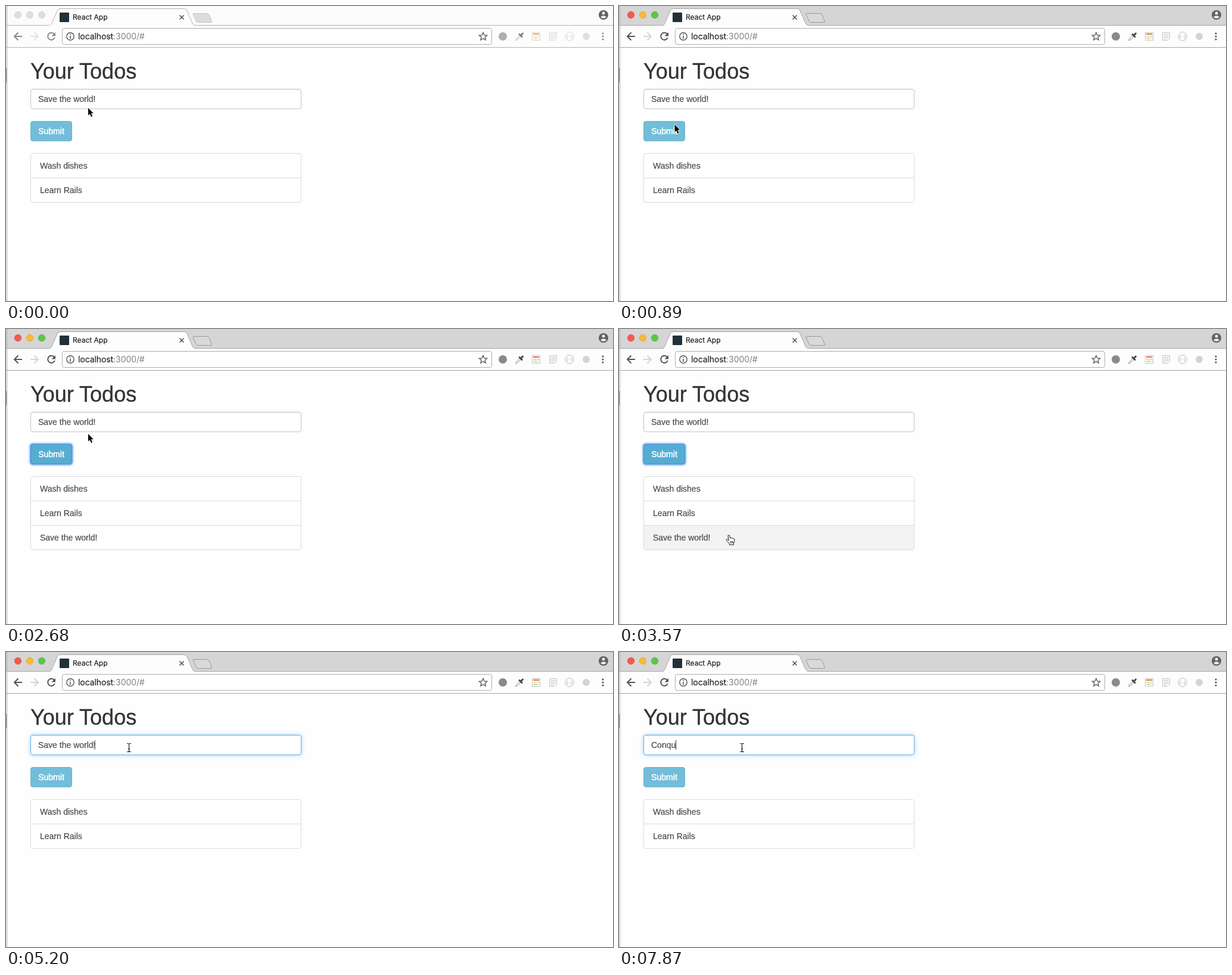
An HTML page for the animation above (8 s loop, 1019 px wide and 495 px high).

```html
<!DOCTYPE html>
<html lang="en">
<head>
<meta charset="utf-8">
<title>Your Todos</title>
<style>
  html, body { margin: 0; width: 100%; height: 100%; overflow: hidden; background: #fefefe; }
  #stage { position: relative; width: 1019px; height: 495px; overflow: hidden;
    font: 14px/20px "Liberation Sans", Arial, sans-serif; color: #484848; -webkit-text-stroke: .18px; }
  #stage > * { position: absolute; box-sizing: border-box; }
  svg { left: 0; top: 0; overflow: visible; -webkit-text-stroke: 0; }
  svg text { font-family: Inter, Roboto, sans-serif; }

  /* browser window */
  .strip { fill: #d5d5d5; }
  .plus { fill: #d9d9d9; stroke: #999; }
  .edge { fill: none; stroke: #a6a6a6; }
  .idle .strip { fill: #fbfbfb; }
  .idle .plus { fill: #dcdcdc; stroke: #c4c4c4; }
  .idle .edge { stroke: #b4b4b4; }
  .idle .lights circle { fill: #dedede; stroke: #d2d2d2; }
  .idle .tools { opacity: .68; }
  .line { fill: none; stroke: #555; stroke-width: 2; }

  /* page */
  h1 { margin: 0; left: 41px; top: 90px; font-size: 36px; line-height: 40px; font-weight: 400;
    color: #333; white-space: nowrap; -webkit-text-stroke: .35px; }
  #field { left: 41px; top: 139px; width: 455px; height: 34px; padding: 8px 12px; line-height: 16px;
    background: #fff; border: 1px solid #c4c4c4; border-radius: 4px; white-space: pre;
    box-shadow: inset 0 1px 1px rgba(0,0,0,.07); }
  #field span { display: inline-block; height: 16px; vertical-align: top; }
  #field .all { background: #b0d3fb; }
  #field .last { background: #c9c9c9; }
  #field .caret { width: 1px; margin-right: -1px; background: #333; }
  #field.half { border-color: #99bedb; box-shadow: 0 0 5px rgba(102,175,233,.35); }
  #field.on { border-color: #6cb0e6; box-shadow: inset 0 1px 1px rgba(0,0,0,.07), 0 0 7px rgba(102,175,233,.6); }
  #button { left: 41px; top: 193px; width: 70px; height: 34px; line-height: 32px; text-align: center;
    color: #fff; -webkit-text-stroke: .5px; background: #73bdd9; border: 1px solid #68b3d2; border-radius: 4px; }
  #button.hover, #button.focus { background: #56add3; border-color: #4a9fc6; }
  #button.down { background: #4598ba; }
  #button.down, #button.focus { border-color: #448fd6; box-shadow: 0 0 3px 1.5px rgba(88,155,248,.9); }
  #button.down { box-shadow: inset 0 3px 5px rgba(0,0,0,.125), 0 0 3px 1.5px rgba(88,155,248,.9); }
  #list { left: 41px; top: 247px; width: 455px; border: 1px solid #dadada; border-radius: 4px;
    background: #fff; overflow: hidden; }
  #list div { height: 40px; line-height: 40px; padding-left: 15px; }
  #list div + div { border-top: 1px solid #dadada; }
  #list .hover { background: #f3f3f3; }
</style>
</head>
<body>
<div id="stage">
  <svg width="1019" height="495">
    <rect class="strip" width="1019" height="33"/>
    <rect y="33" width="1019" height="37" fill="#fdfdfd"/>
    <path d="M72 33C76 33 76 31 77 29L86 8Q87.500 4.500 91 4.500H299Q302.500 4.500 304 8L313 29Q315 33 318 33Z" fill="#fdfdfd"/>
    <path class="edge" d="M0 32.500H71C75 32.500 76 31 77 29L86 8Q87.500 4.500 91 4.500H299Q302.500 4.500 304 8L313 29Q315 32.500 318 32.500H1019M0 69.500H1019"/>
    <path class="plus" d="M315.500 12.500H337Q340 12.500 341 15L345.500 26Q346 27.500 344 27.500H323Q320 27.500 319 25L314 14Q313.500 12.500 315.500 12.500Z"/>
    <path d="M1.500 0V495" stroke="#adadad"/>
    <path d="M1 104V128" stroke="#a0a0a0" stroke-width="2"/>
    <g class="lights" stroke-width=".7">
      <circle cx="20" cy="15" r="5.700" fill="#f25a50" stroke="#dc473f"/>
      <circle cx="40" cy="15" r="5.700" fill="#f6bb36" stroke="#dda22c"/>
      <circle cx="60" cy="15" r="5.700" fill="#5dc649" stroke="#4aad37"/>
    </g>
    <rect x="90" y="11" width="16" height="16" rx="1" fill="#22303a"/>
    <text x="112" y="23" font-size="12" fill="#1c1c1c" stroke="#1c1c1c" stroke-width=".2">React App</text>
    <path d="M291.500 15.500L298.500 22.500M298.500 15.500L291.500 22.500" stroke="#4d4d4d" stroke-width="1.500"/>
    <circle cx="1003" cy="15" r="8" fill="#616161"/>
    <circle cx="1003" cy="12" r="2.500" fill="#eee"/>
    <path d="M998 18.500Q1003 14 1008 18.500Q1003 23 998 18.500Z" fill="#eee"/>

    <rect x="94.500" y="37.500" width="721" height="27" rx="3" fill="#fff" stroke="#adadad"/>
    <circle cx="108" cy="51" r="6.200" fill="none" stroke="#555" stroke-width="1.400"/>
    <path d="M108 47V48.600M108 50V55" stroke="#555" stroke-width="1.600"/>
    <text x="121" y="56" font-size="14" letter-spacing="-.08" fill="#222" stroke="#222" stroke-width=".15">localhost<tspan fill="#808080" stroke="none">:3000/#</tspan></text>
    <path d="M801 44.500L802.900 49L807.600 49.300L804 52.400L805.200 57.100L801 54.500L796.800 57.100L798 52.400L794.400 49.300L799.100 49Z" fill="none" stroke="#555" stroke-width="1.300"/>
    <g class="tools">
      <path class="line" d="M27 51H14.500M20.500 44.500L14 51L20.500 57.500"/>
      <path class="line" d="M41 51H53.500M47.500 44.500L54 51L47.500 57.500" style="stroke:#d4d4d4"/>
      <path class="line" d="M80.800 47A6 6 0 1 0 81.800 53"/>
      <path d="M83 44V50.500H76.500Z" fill="#555"/>
      <circle cx="834" cy="51" r="7" fill="#8a8a8a"/>
      <path d="M855.500 58L856.500 55L862.500 49L864.500 51L858.500 57Z" fill="#eee" stroke="#999"/>
      <path d="M862 47.500L866 51.500M864.500 49L867.500 46" stroke="#484848" stroke-width="3" stroke-linecap="round"/>
      <rect x="883.500" y="44.500" width="13" height="13" fill="#fffdf2" stroke="#c5c5b8"/>
      <path d="M885 47H895" stroke="#ea6b5b" stroke-width="2"/>
      <path d="M886 51.500H890M891.500 51.500H895" stroke="#ddb84c"/>
      <path d="M886 54.500H892" stroke="#86bd68"/>
      <path d="M912.500 44.500H924.500V54L921 57.500H912.500Z" fill="#f7f7f7" stroke="#c6c6c6"/>
      <path d="M914.500 47.500H922.500M914.500 50H922.500M914.500 52.500H922.500M914.500 55H919" stroke="#cdcdcd"/>
      <circle cx="946" cy="51" r="7.300" fill="#fff" stroke="#bcbcbc"/>
      <text x="946" y="54" font-size="8" text-anchor="middle" fill="#999">{··}</text>
      <circle cx="974" cy="51" r="6" fill="#d3d3d3"/>
      <g fill="#555"><circle cx="1002" cy="46" r="1.600"/><circle cx="1002" cy="51" r="1.600"/><circle cx="1002" cy="56" r="1.600"/></g>
    </g>
  </svg>

  <h1>Your Todos</h1>
  <div id="field"></div>
  <div id="button">Submit</div>
  <div id="list"></div>

  <svg width="1019" height="495">
    <g id="cursor" stroke-linejoin="round">
      <path id="arrow" d="M0 0V12.500L2.800 9.900L4.900 15L7 14.100L4.900 9H8.700Z" fill="#000" stroke="#fff" stroke-width="1.600" paint-order="stroke"/>
      <path id="hand" d="M4 2C4 .3 6.500 .3 6.800 2L7.500 6C8 4.700 10 4.900 10.200 6.300C10.900 5.300 12.600 5.700 12.700 7C13.600 6.300 15 7 15 8.300C15.200 11 14.300 12.500 13.500 14.500V17H6.300V15.500C4.300 13.500 3.300 11.300 1.300 9.500C.3 8.200 2 7 3.500 8.300L5.200 10Z M8.300 11V14.500M10.300 11V14.500M12.200 11V14.500" fill="#fff" stroke="#111"/>
      <path id="beam" d="M0 .5H2Q3.500 .5 3.500 2.500V12.500Q3.500 14.500 2 14.500H0M7 .5H5Q3.500 .5 3.500 2.500M3.500 12.500Q3.500 14.500 5 14.500H7M2 9.500H5" fill="none" stroke="#222" stroke-width="1.200"/>
    </g>
  </svg>
</div>
<script>
const LOOP = 8000;
const $ = id => document.getElementById(id);
const TODO = 'Save the world!';
const ROWS = ['Wash dishes', 'Learn Rails', TODO];
const CARET = '<span class="caret"></span>';
const at = (kind, x, y) => ({ kind, x, y });

// Each step changes part of the state and holds until the next one.
const steps = [
  [0, { ...at('arrow', 138, 171), window: 'idle', field: '', text: TODO, button: '', rows: 2, hover: -1 }],
  [140, at('arrow', 140, 171)],
  [590, { ...at('arrow', 138, 172), window: '' }],
  [740, at('arrow', 118, 186)],
  [890, at('arrow', 93.5, 199)],
  [1030, { ...at('hand', 85, 208), button: 'hover' }],
  [1180, at('hand', 84, 216)],
  [1930, { button: 'down' }],
  [2080, { button: 'focus', rows: 3 }],
  [2530, at('hand', 96, 206)],
  [2680, at('arrow', 138, 176)],
  [2830, at('beam', 163, 163)],
  [2980, at('arrow', 180, 180)],
  [3120, at('arrow', 190, 215)],
  [3270, { ...at('hand', 187, 262), hover: 0 }],
  [3420, { ...at('hand', 183, 313), hover: 1 }],
  [3570, { ...at('hand', 179, 345), hover: 2 }],
  [3860, { button: '' }],
  [4160, { ...at('arrow', 184, 346), rows: 2, hover: -1 }],
  [4310, at('arrow', 205, 137)],
  [4600, at('beam', 203, 146)],
  [4750, at('beam', 203, 153)],
  [5050, { field: 'half', text: TODO + CARET }],
  [5200, { field: 'on', text: 'Save the world<span class="last">!</span>' }],
  [5950, { text: `<span class="all">${TODO}</span>` }],
  [6990, { text: CARET }],
  ...[7140, 7430, 7580, 7720, 7870].map((t, i) => [t, { text: 'Conqu'.slice(0, i + 1) + CARET }])
];

function show(s) {
  $('stage').className = s.window;
  $('field').className = s.field;
  $('field').innerHTML = s.text;
  $('button').className = s.button;
  $('list').innerHTML = ROWS.slice(0, s.rows)
    .map((row, i) => `<div class="${i === s.hover ? 'hover' : ''}">${row}</div>`).join('');
  for (const kind of ['arrow', 'hand', 'beam']) $(kind).style.display = kind === s.kind ? '' : 'none';
  $('cursor').setAttribute('transform', `translate(${s.x} ${s.y})`);
}

const start = performance.now();
let shown = 0;
function tick() {
  const t = (performance.now() - start) % LOOP;
  const past = steps.filter(([time]) => time <= t);
  if (past.length !== shown) {
    shown = past.length;
    show(Object.assign({}, ...past.map(([, change]) => change)));
  }
  requestAnimationFrame(tick);
}
tick();
</script>
</body>
</html>
```
